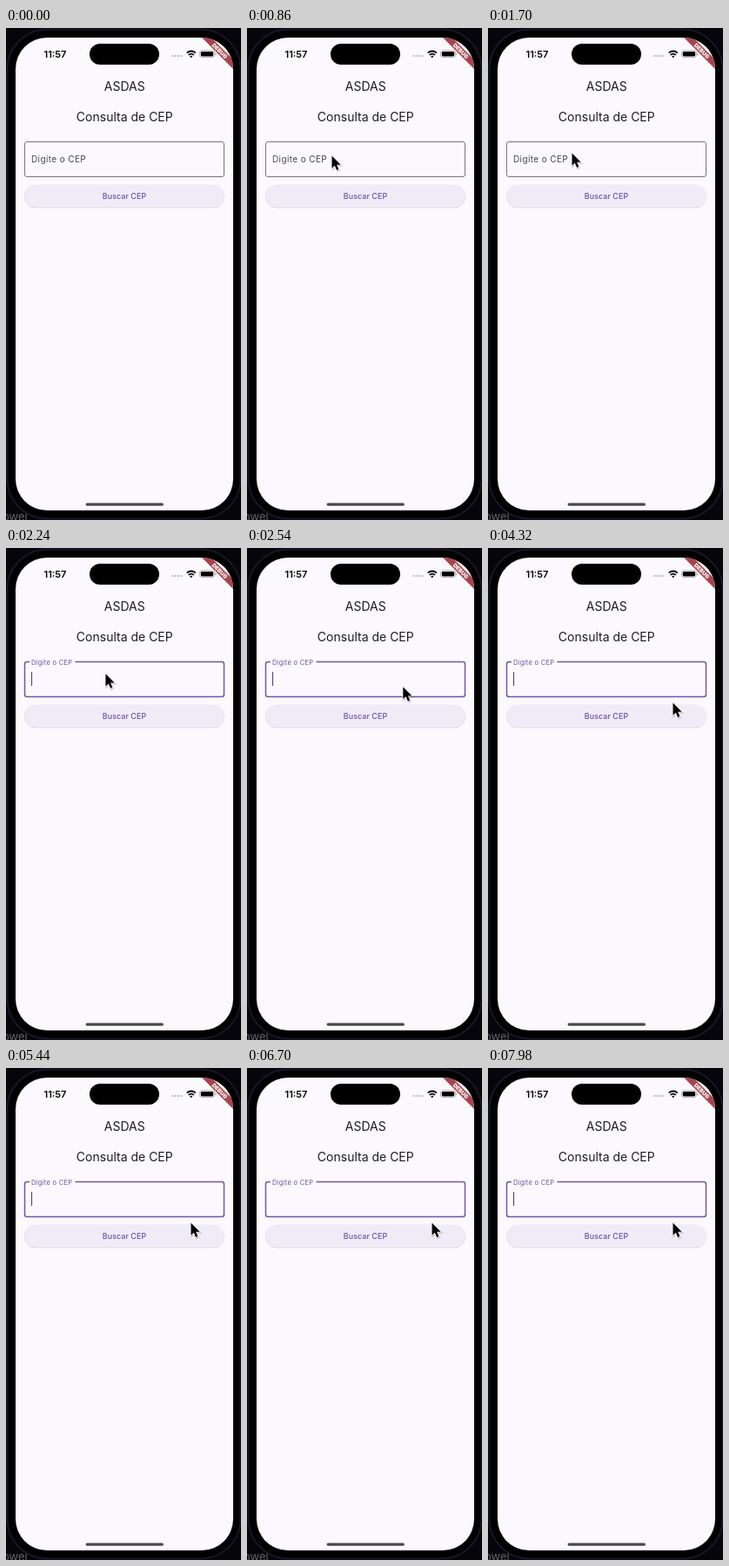
An HTML page for the animation above (8000 ms loop, 270 by 564 pixels).

```html
<!DOCTYPE html>
<html lang="pt-BR">
<head>
<meta charset="utf-8">
<title>Consulta de CEP</title>
<style>
  html, body { margin: 0; width: 100%; height: 100%; overflow: hidden; background: #06060a; }
  svg { display: block; width: 100%; height: 100%; }
  text { font-family: Inter, "Noto Sans", sans-serif; fill: #1d1b20; }
  .middle { text-anchor: middle; }
</style>
</head>
<body>
<svg viewBox="0 0 270 564">
  <defs>
    <clipPath id="screen"><rect x="11" y="11" width="250" height="542" rx="36"/></clipPath>
  </defs>

  <!-- Window behind the phone -->
  <rect width="270" height="564" fill="#06060a"/>
  <text x="-4" y="565" font-size="13" style="fill:#626266">owel</text>

  <!-- Phone body -->
  <rect x="1.5" y="1.5" width="268" height="561" rx="46" fill="#000" stroke="#17172a" stroke-width="2"/>
  <rect x="4" y="4" width="263" height="556" rx="43" fill="#000"/>

  <g clip-path="url(#screen)">
    <rect x="11" y="11" width="250" height="542" fill="#fcf9fe"/>

    <!-- Status bar -->
    <text x="43.5" y="34" font-size="11" font-weight="600" style="fill:#000">11:57</text>
    <rect x="96" y="18" width="80" height="24" rx="12"/>
    <path d="M190.5 32h12" stroke="#bfbcc2" stroke-width="2" stroke-dasharray="2 1.3"/>
    <g fill="none" stroke="#000" stroke-width="1.8">
      <path d="M207.8 28.6a7 7 0 0 1 10 0M209.7 31a4.3 4.3 0 0 1 6.2 0"/>
      <path d="M212.8 34.2l-1.6-1.8a2.3 2.3 0 0 1 3.2 0z" fill="#000" stroke="none"/>
    </g>
    <rect x="222.5" y="25.7" width="17" height="8" rx="2.5" fill="none" stroke="#a6a4a9" stroke-width=".8"/>
    <rect x="223.8" y="27" width="14.4" height="5.4" rx="1.4"/>
    <path d="M241 28.3v2.8" stroke="#a6a4a9"/>

    <!-- Debug ribbon -->
    <g transform="translate(261 11) rotate(45)">
      <rect x="-26" y="17.8" width="52" height="7.6" fill="#a8444b"/>
      <text class="middle" y="23.9" font-size="6.3" font-weight="900" style="fill:#fff">DEBUG</text>
    </g>

    <text class="middle" x="136.3" y="71.5" font-size="14">ASDAS</text>
    <text class="middle" x="136.3" y="107.2" font-size="14">Consulta de CEP</text>

    <!-- Text field -->
    <rect id="outline" x="21.5" y="130.5" width="229" height="40" rx="2.5" fill="none"/>
    <rect id="gap" x="27" y="129" height="3" fill="#fcf9fe"/>
    <text id="label" font-size="10" letter-spacing=".38">Digite o CEP</text>
    <rect id="caret" x="28.9" y="142" width="1.2" height="16" fill="#5a4a86"/>

    <!-- Button -->
    <rect x="21" y="181" width="230" height="25.2" rx="12.6" fill="#dfd0ca"/>
    <rect x="21" y="180" width="230" height="25.4" rx="12.7" fill="#f0ecf7" stroke="#e8e3f1" stroke-width=".6"/>
    <text class="middle" x="136" y="195.6" font-size="8.9" font-weight="500" letter-spacing=".08" style="fill:#6750a4">Buscar CEP</text>

    <rect x="91.5" y="544.5" width="89.5" height="3.2" rx="1.6" fill="#4b4850"/>
  </g>

  <g id="pointer">
    <path d="M1 2v14l3.4-3 2.3 5.2 2.4-1-2.2-5.2h4.5z" fill="#0003" stroke="#0002" stroke-width="2"/>
    <path d="M.5.5v14.2l3.3-3 2.3 5.3 2.3-1-2.2-5.2h4.5z" stroke="#fff" stroke-width="1.6" paint-order="stroke" stroke-linejoin="round"/>
  </g>
</svg>
<script>
  const LOOP = 8000, FOCUS = 2030, FLOAT_TIME = 167;
  const $ = id => document.getElementById(id);
  const clamp = v => Math.min(1, Math.max(0, v));
  const mix = (a, b, p) => a + (b - a) * p;
  const smooth = p => p * p * (3 - 2 * p);
  const set = (id, attrs) => Object.entries(attrs).forEach(([k, v]) => $(id).setAttribute(k, v));

  // Pointer stops: time, x, y
  const stops = [
    [300, 272, 225], [850, 97, 146], [1200, 97, 146], [1500, 96, 143],
    [2050, 96, 143], [2840, 218, 177], [3600, 218, 177], [4200, 212, 177], [LOOP, 212, 177]
  ];

  // Each move is eased; the vertical part lags, which bends the path
  function pointerAt(t) {
    const i = Math.max(1, stops.findIndex(s => s[0] >= t));
    const [t0, x0, y0] = stops[i - 1], [t1, x1, y1] = stops[i];
    const p = smooth(clamp((t - t0) / (t1 - t0)));
    return [mix(x0, x1, p), mix(y0, y1, p * p)];
  }

  // Steady for half a second, then fades out and back in
  function caretOpacity(t) {
    if (t < FOCUS) return 0;
    const phase = (t - FOCUS) % 1000;
    return phase < 750 ? clamp((650 - phase) / 120) : clamp((phase - 840) / 110);
  }

  function draw(now) {
    const t = now % LOOP;
    const p = smooth(clamp((t - FOCUS) / FLOAT_TIME));
    const focused = t >= FOCUS;
    set('outline', { stroke: focused ? '#6f55ac' : '#79747e', 'stroke-width': mix(1, 1.5, p) });
    set('gap', { width: 52.5 * p });
    set('label', {
      transform: `translate(29 ${mix(154.2, 133.5, p)}) scale(${mix(1, .75, p)})`,
      style: `fill:${focused ? '#6750a4' : '#49454f'}`
    });
    set('caret', { opacity: caretOpacity(t) });
    set('pointer', {
      transform: `translate(${pointerAt(t)})`,
      visibility: t < stops[0][0] ? 'hidden' : 'visible'
    });
  }

  const start = performance.now();
  function tick() {
    draw(performance.now() - start);
    requestAnimationFrame(tick);
  }
  tick();
</script>
</body>
</html>
```
